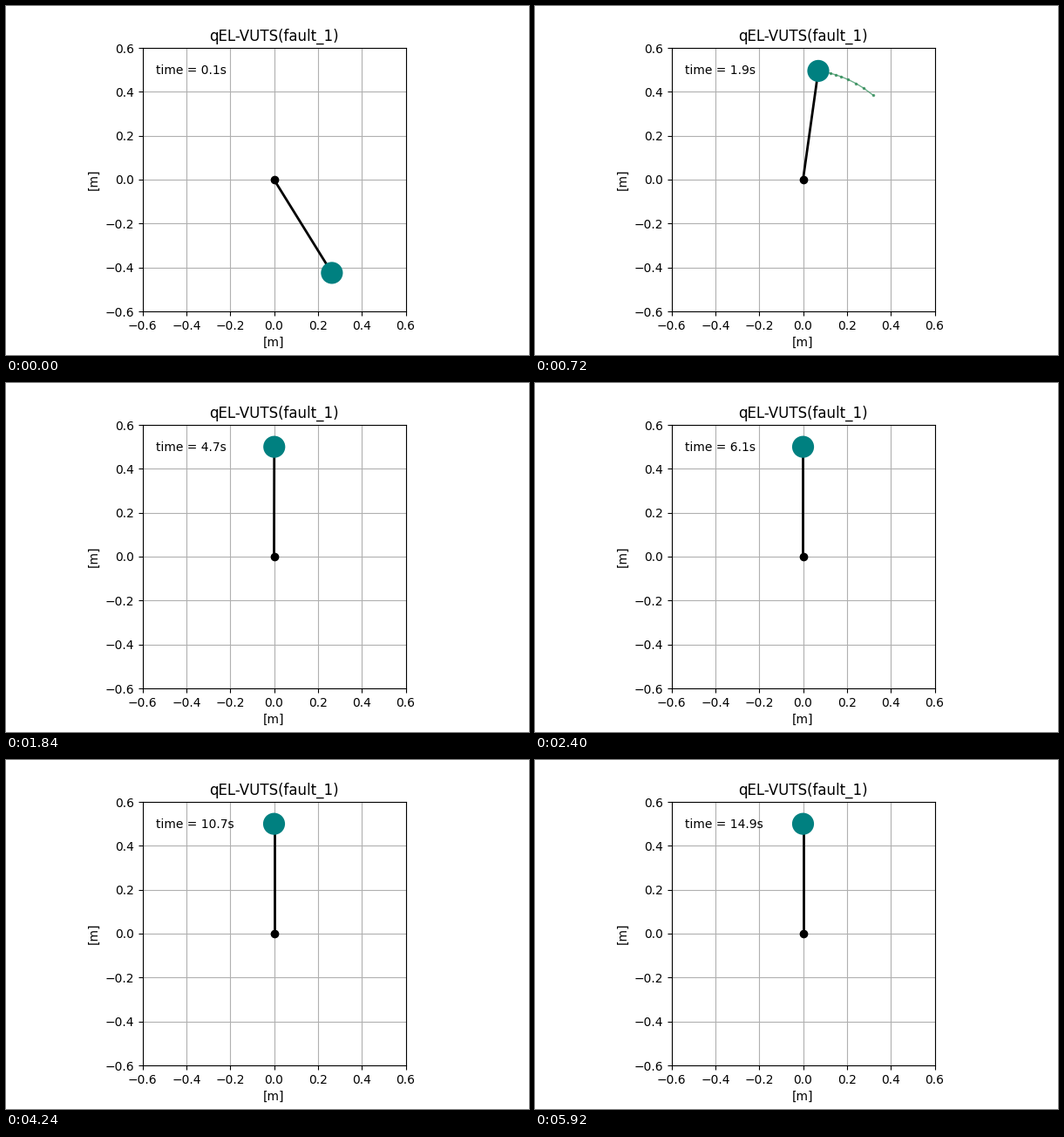
A matplotlib script for the animation above (5.96 s loop, 600x400 px).

```python
import numpy as np
import matplotlib.pyplot as plt
from matplotlib.animation import FuncAnimation
from matplotlib.patches import Circle

FRAMES = 149
STEP = 0.1       # simulated seconds per frame
LENGTH = 0.5     # rod length in metres
TRAIL = 10       # past steps kept in the trail
DECAY = 0.151    # settling rate per step near upright

# Angle from upright: the swing-up, then an exponential approach to zero
swing = np.array([2.586, 2.72, 2.46, 1.98, 1.50, 1.145, 0.95, 0.81,
                  0.693, 0.585, 0.503, 0.426, 0.357, 0.303, 0.255])
settle = swing[-1] * np.exp(-DECAY * np.arange(1, FRAMES - len(swing) + 1))
theta = np.concatenate([swing, settle])
xs, ys = LENGTH * np.sin(theta), LENGTH * np.cos(theta)

fig = plt.figure(figsize=(6, 4), dpi=100)
fig.subplots_adjust(left=0.125, right=0.9, bottom=0.125, top=0.88)
ax = fig.add_subplot(aspect="equal", xlim=(-0.6, 0.6), ylim=(-0.6, 0.6))
ticks = np.linspace(-0.6, 0.6, 7).round(1)
ax.set_xticks(ticks)
ax.set_yticks(ticks)
ax.grid()
ax.set_title("qEL-VUTS(fault_1)")
ax.set_xlabel("[m]")
ax.set_ylabel("[m]")

rod, = ax.plot([], [], "o-", color="black", lw=2)
trail, = ax.plot([], [], ".-", color="seagreen", lw=1, ms=3, alpha=0.7)
bob = ax.add_patch(Circle((xs[0], ys[0]), 0.05, fc="teal", zorder=10))
clock = ax.text(0.05, 0.9, "", transform=ax.transAxes)


def update(i):
    past = slice(max(0, i - TRAIL), i + 1)
    rod.set_data([0, xs[i]], [0, ys[i]])
    trail.set_data(xs[past], ys[past])
    bob.center = xs[i], ys[i]
    clock.set_text(f"time = {(i + 1) * STEP:.1f}s")
    return rod, trail, bob, clock


anim = FuncAnimation(fig, update, frames=FRAMES, interval=40,
                     repeat=True, repeat_delay=0)
plt.show()
```
